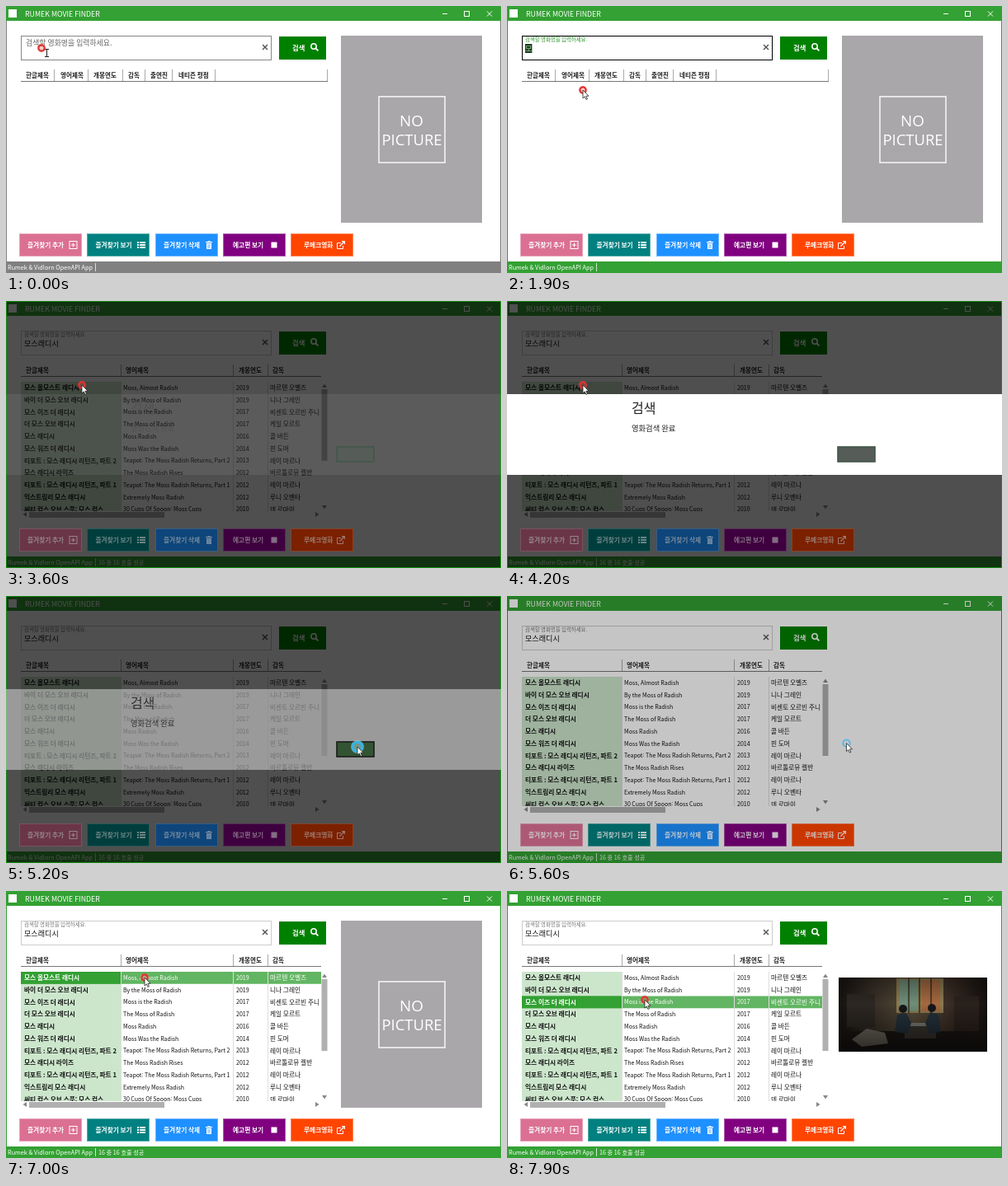
These frames come from a looping animation (600 by 324 pixels, 8 s). An HTML page with a canvas:

```html
<!DOCTYPE html>
<html lang="ko">
<head>
<meta charset="utf-8">
<title>Movie finder</title>
<style>
html, body { margin: 0; width: 100%; height: 100%; overflow: hidden; background: #fff; }
canvas { display: block; }
</style>
</head>
<body>
<canvas id="stage" width="600" height="324"></canvas>
<script>
const ctx = document.getElementById('stage').getContext('2d');
const LOOP = 8000;
const GREEN = '#33a133', HOVER = '#62b562', PALE = '#cce6cc';
const SANS = '"Noto Sans CJK KR", "Noto Sans CJK JP", "Noto Sans CJK", sans-serif';
const ROW_TOP = 98, ROW_H = 14.75;

const films = [
  ['모스 올모스트 래디시', 'Moss, Almost Radish', 2019, '마르텐 오벨즈'],
  ['바이 더 모스 오브 래디시', 'By the Moss of Radish', 2019, '니나 그레인'],
  ['모스 이즈 더 래디시', 'Moss is the Radish', 2017, '비센토 오르빈 주니'],
  ['더 모스 오브 래디시', 'The Moss of Radish', 2017, '케일 모르트'],
  ['모스 래디시', 'Moss Radish', 2016, '콜 바든'],
  ['모스 워즈 더 래디시', 'Moss Was the Radish', 2014, '핀 도머'],
  ['티포트 : 모스 래디시 리턴즈, 파트 2', 'Teapot: The Moss Radish Returns, Part 2', 2013, '레이 마르나'],
  ['모스 래디시 라이즈', 'The Moss Radish Rises', 2012, '바르톨로뮤 켈반'],
  ['티포트 : 모스 래디시 리턴즈, 파트 1', 'Teapot: The Moss Radish Returns, Part 1', 2012, '레이 마르나'],
  ['익스트림리 모스 래디시', 'Extremely Moss Radish', 2012, '루니 오벤타'],
  ['써티 컵스 오브 스푼: 모스 컵스', '30 Cups Of Spoon: Moss Cups', 2010, '덴 로마이']
];

const typing = [
  [1700, 'ㅁ'], [1800, '모'], [2000, '모ㅅ'], [2100, '모스'], [2200, '모스ㄹ'],
  [2300, '모스래'], [2400, '모스래ㄷ'], [2600, '모스래디'], [2700, '모스래디ㅅ'], [2800, '모스래디시']
];

// Pointer stops: time, x, y
const path = [
  [0, 43, 51], [300, 43, 51], [800, 92, 102], [4200, 92, 102], [4900, 426, 183],
  [5500, 426, 183], [6200, 168, 105], [7100, 168, 105], [7350, 167, 132], [LOOP, 167, 132]
];

const ramp = (t, a, b) => Math.min(1, Math.max(0, (t - a) / (b - a)));
const ease = k => k * k * (3 - 2 * k);

function rect(x, y, w, h, color) {
  ctx.fillStyle = color;
  ctx.fillRect(x, y, w, h);
}

function frame(x, y, w, h, color, width = 1) {
  ctx.strokeStyle = color;
  ctx.lineWidth = width;
  ctx.strokeRect(x, y, w, h);
}

function line(color, width, ...pts) {
  ctx.strokeStyle = color;
  ctx.lineWidth = width;
  ctx.beginPath();
  for (let i = 0; i < pts.length; i += 2) ctx.lineTo(pts[i], pts[i + 1]);
  ctx.stroke();
}

function shape(color, ...pts) {
  ctx.fillStyle = color;
  ctx.beginPath();
  for (let i = 0; i < pts.length; i += 2) ctx.lineTo(pts[i], pts[i + 1]);
  ctx.fill();
}

function disc(x, y, r, color) {
  ctx.fillStyle = color;
  ctx.beginPath();
  ctx.arc(x, y, r, 0, 7);
  ctx.fill();
}

function ring(x, y, r, color, width) {
  ctx.strokeStyle = color;
  ctx.lineWidth = width;
  ctx.beginPath();
  ctx.arc(x, y, r, 0, 7);
  ctx.stroke();
}

// y is the vertical middle of the glyphs
function text(str, x, y, size, color, weight = 400, font = SANS) {
  ctx.font = `${weight} ${size}px ${font}`;
  ctx.fillStyle = color;
  ctx.fillText(str, x, y + size * 0.36);
}

function clip(x, y, w, h, draw) {
  ctx.save();
  ctx.beginPath();
  ctx.rect(x, y, w, h);
  ctx.clip();
  draw();
  ctx.restore();
}

function fade(alpha, draw) {
  if (alpha <= 0) return;
  ctx.save();
  ctx.globalAlpha = alpha;
  draw();
  ctx.restore();
}

function pointer(t) {
  const i = Math.max(1, path.findIndex(p => p[0] > t));
  const [a, x, y] = path[i - 1], [b, x2, y2] = path[i];
  const k = ease(ramp(t, a, b));
  return [x + (x2 - x) * k, y + (y2 - y) * k];
}

function drawWindow(active, found) {
  rect(0, 0, 600, 324, '#fff');
  frame(0.5, 0.5, 599, 323, active ? GREEN : '#808080');
  rect(0, 0, 600, 18, GREEN);
  rect(3, 4, 10, 10, '#fff');
  text('RUMEK MOVIE FINDER', 23, 9.5, 8.8, '#fff');
  line('#fff', 1, 529, 9.5, 535, 9.5);
  frame(555.5, 6.5, 6, 6, '#fff');
  line('#fff', 1, 583, 6.5, 589, 12.5);
  line('#fff', 1, 589, 6.5, 583, 12.5);

  rect(0, 310, 600, 14, active ? GREEN : '#808080');
  text('Rumek & Vidlorn OpenAPI App', 2, 317, 7.3, '#fff');
  line('#cfe6cf', 1, 108.5, 312, 108.5, 322);
  if (found) text('16 중 16 호출 성공', 112, 317, 7.2, '#fff');
}

function drawSearch(t, focused) {
  const border = t < 300 ? '#868686' : focused ? '#000' : '#ccc';
  frame(18.5, 36.5, 303, 29, border);
  line('#555', 1.4, 311, 47, 317, 53);
  line('#555', 1.4, 317, 47, 311, 53);

  const prompt = '검색할 영화명을 입력하세요.';
  const step = typing.filter(s => s[0] <= t).pop();
  if (!step) {
    text(prompt, 24, 44.5, 8.9, '#666');
  } else {
    const k = ramp(t, 1700, 1850);
    fade(k, () => text(prompt, 22, 41 + 4 * (1 - k), 6.4, focused ? '#2a962a' : '#777'));
    text(step[1], 22, 52, 9.1, '#111');
    const end = 22 + ctx.measureText(step[1]).width;
    if (t < 2800) {
      rect(end - 8.4, 46, 8.4, 11, '#1c3d1c');
      text(step[1].slice(-1), end - 8.4, 52, 9.1, '#9fd09f');
    } else if (focused) {
      line('#000', 1, Math.round(end) + 0.5, 47, Math.round(end) + 0.5, 57);
    }
  }

  rect(331, 37, 57, 28, '#008000');
  text('검색', 347, 51, 8.3, '#fff', 700);
  ring(373, 49, 3.2, '#fff', 1.5);
  line('#fff', 1.8, 375.4, 51.4, 378.4, 54.4);
}

function drawHeader(labels, separators, right) {
  for (const [x, label] of labels) text(label, x, 84, 7.6, '#222', 700);
  for (const x of separators) line('#aaa', 1, x + 0.5, 77, x + 0.5, 91);
  line('#777', 1, 18, 91.5, right, 91.5);
}

function drawRows(hover, selected) {
  clip(18, ROW_TOP, 364, 157, () => {
    rect(18, ROW_TOP, 121, 157, PALE);
    films.forEach(([korean, english, year, director], i) => {
      const y = ROW_TOP + i * ROW_H, mid = y + 7.4;
      const lit = i === hover || i === selected;
      if (lit) {
        rect(18, y, 364, ROW_H, HOVER);
        if (i === selected) rect(18, y, 121, ROW_H, GREEN);
      }
      const ink = lit ? '#fff' : '#111';
      text(korean, 22, mid, 7.7, ink, 700);
      text(english, 142, mid, 7, ink);
      text(year, 279, mid, 7.1, ink);
      text(director, 320, mid, 7.7, ink);
    });
    for (const x of [139.5, 275.5, 317.5]) line('#ddd', 1, x, ROW_TOP, x, 255);
  });

  rect(382.5, 107, 7, 87, '#b0b0b0');
  shape('#888', 383, 105, 389, 105, 386, 100.5);
  shape('#888', 383, 248, 389, 248, 386, 252.5);
  rect(28, 256, 164, 7, '#b0b0b0');
  shape('#888', 25, 256, 25, 262, 20.5, 259);
  shape('#888', 375, 256, 375, 262, 379.5, 259);
}

function drawGrid(found, hover, selected) {
  if (found) {
    drawHeader([[24, '한글제목'], [145, '영어제목'], [282, '개봉연도'], [323, '감독']],
      [139, 275, 317], 382);
    drawRows(hover, selected);
  } else {
    drawHeader([[24, '한글제목'], [66, '영어제목'], [106, '개봉연도'], [148, '감독'],
      [175, '출연진'], [209, '네티즌 평점']], [58, 99, 141, 168, 201, 253, 389], 390);
  }
}

const icons = {
  add(x) {
    frame(x - 4.5, 285.5, 9, 9, '#fff');
    line('#fff', 1, x - 2.5, 290, x + 2.5, 290);
    line('#fff', 1, x, 287.5, x, 292.5);
  },
  list(x) {
    for (const y of [286, 289, 292]) {
      rect(x - 5, y, 2, 2, '#fff');
      rect(x - 2, y, 7, 2, '#fff');
    }
  },
  trash(x) {
    rect(x - 4, 286, 8, 1.3, '#fff');
    rect(x - 1.5, 285, 3, 1, '#fff');
    rect(x - 3, 288, 6, 7, '#fff');
    for (const dx of [-1, 1]) line('#1e90ff', 0.7, x + dx, 289, x + dx, 294);
  },
  video(x) { rect(x - 3.5, 286.5, 7, 7, '#fff'); },
  link(x) {
    line('#fff', 1, x, 287.5, x - 4.5, 287.5, x - 4.5, 294.5, x + 2.5, 294.5, x + 2.5, 291);
    line('#fff', 1.2, x - 1.5, 291.5, x + 4, 286);
    line('#fff', 1.2, x + 1, 285.7, x + 4.3, 285.7, x + 4.3, 289);
  }
};

const actions = [
  [16, '#db7093', '즐겨찾기 추가', 26, 'add', 81.5],
  [98, '#008080', '즐겨찾기 보기', 108.5, 'list', 164],
  [181, '#1e90ff', '즐겨찾기 삭제', 191, 'trash', 246],
  [263, '#800080', '예고편 보기', 275, 'video', 325],
  [345, '#ff4500', '루메크영화', 361, 'link', 406]
];

function drawActions() {
  for (const [x, color, label, tx, icon, ix] of actions) {
    rect(x, 276, 76, 28, color);
    ctx.setLineDash([1, 1]);
    frame(x + 0.5, 276.5, 75, 27, 'rgba(255,255,255,.7)');
    ctx.setLineDash([]);
    text(label, tx, 290, 7.7, '#fff', 700);
    icons[icon](ix);
  }
}

function drawBlankPoster() {
  rect(406, 36, 171, 227, '#a9a7a9');
  frame(452, 110, 80, 80, '#f4f4f4', 1.6);
  ctx.textAlign = 'center';
  text('NO', 491.5, 139, 18.8, '#fff', 400, '"Open Sans", sans-serif');
  text('PICTURE', 492, 162, 18.4, '#fff', 400, '"Open Sans", sans-serif');
  ctx.textAlign = 'left';
}

function drawPhoto() {
  clip(402, 105, 180, 90, () => {
    const wall = ctx.createLinearGradient(402, 0, 582, 0);
    [[0, '#15120f'], [0.25, '#3a3128'], [0.5, '#554a38'], [0.75, '#3b2d24'], [1, '#15110f']]
      .forEach(s => wall.addColorStop(...s));
    rect(402, 105, 180, 90, wall);
    rect(472, 106, 57, 42, '#8a7a50');
    rect(476, 108, 22, 38, '#6f8d78');
    rect(503, 108, 22, 38, '#a4683f');
    for (const x of [487, 500, 514]) line('#3a2e22', 1.5, x, 106, x, 148);
    rect(412, 125, 34, 40, '#2c2722');
    rect(542, 128, 30, 42, '#2a211c');
    rect(402, 170, 180, 25, '#1a1613');
    shape('#6d675d', 418, 180, 436, 167, 458, 172, 462, 185, 430, 189);
    rect(478, 160, 46, 4, '#797b77');
    rect(482, 164, 38, 15, '#39342e');
    disc(480, 143, 5, '#17171a');
    shape('#24313a', 470, 171, 473, 150, 484, 148, 490, 160, 486, 173);
    disc(515, 142, 5, '#17171a');
    shape('#24313a', 526, 171, 523, 150, 513, 147, 507, 160, 511, 173);
    const shade = ctx.createLinearGradient(0, 105, 0, 195);
    shade.addColorStop(0, 'rgba(0,0,0,.35)');
    shade.addColorStop(0.35, 'rgba(0,0,0,0)');
    shade.addColorStop(1, 'rgba(0,0,0,.6)');
    rect(402, 105, 180, 90, shade);
  });
}

function drawDialog(t) {
  const dim = ramp(t, 3250, 3550) * (1 - ramp(t, 5400, 5700));
  if (!dim) return;
  fade(dim * 0.69, () => rect(0, 0, 600, 324, '#000'));
  fade(dim * 0.25, drawActions);
  fade(dim, () => frame(0.5, 0.5, 599, 323, '#148c14'));

  const shown = t < 5000 ? ramp(t, 3580, 3900) : 1 - ramp(t, 5000, 5350);
  fade(shown, () => rect(0, 113, 600, 98, '#fff'));
  fade(Math.min(1, shown * 2), () => {
    text('검색', 151, 130.5, 16, '#222');
    text('영화검색 완료', 151, 155, 9.3, '#222');
  });
  fade(ramp(t, 3450, 3600) * (1 - ramp(t, 5250, 5450)), () => {
    const over = t >= 4800;
    rect(401, 177, 45, 18, over ? '#335433' : '#565c58');
    frame(401, 177, 45, 18, over ? '#1b1b1b' : '#42584a', 1.6);
  });
}

function drawPointer(t, x, y) {
  if (t >= 4800 && t < 6700) {
    const press = t < 5500;
    if (press) disc(x, y, 8, 'rgba(190,235,250,.45)');
    ring(x, y, press ? 5.8 : 4.2, press ? '#35b5e5' : '#58b8ea', press ? 3 : 2);
  } else {
    disc(x, y, 5.3, 'rgba(240,80,80,.3)');
    ring(x, y, 3.6, '#e0322f', 2.2);
  }
  if (t < 500) {
    line('#222', 1, x + 4, y + 1.5, x + 9, y + 1.5);
    line('#222', 1, x + 6.5, y + 2, x + 6.5, y + 10);
    line('#222', 1, x + 4, y + 10.5, x + 9, y + 10.5);
    return;
  }
  ctx.save();
  ctx.translate(x, y);
  const arrow = [0, 0, 0, 10, 2.3, 7.9, 3.9, 11.5, 5.5, 10.8, 3.9, 7.3, 7, 7.2, 0, 0];
  shape('#fff', ...arrow);
  line('#222', 0.8, ...arrow);
  ctx.restore();
}

function draw(t) {
  const [x, y] = pointer(t);
  const found = t >= 3200;
  const focused = t >= 300 && t < 3300 || t >= 5700 && t < 6800;
  const overGrid = t >= 5700 && x < 382;
  const hover = overGrid ? Math.floor((y - ROW_TOP) / ROW_H) : -1;
  const selected = t < 6800 ? -1 : t < 7400 ? 0 : 2;

  drawWindow(t >= 300, found);
  drawSearch(t, focused);
  drawGrid(found, hover, selected);
  drawActions();
  if (!found || t >= 6900 && t < 7450) drawBlankPoster();
  if (t >= 7500) drawPhoto();
  drawDialog(t);
  drawPointer(t, x, y);
}

const start = performance.now();
function tick() {
  draw((performance.now() - start) % LOOP);
  requestAnimationFrame(tick);
}
tick();
</script>
</body>
</html>
```
